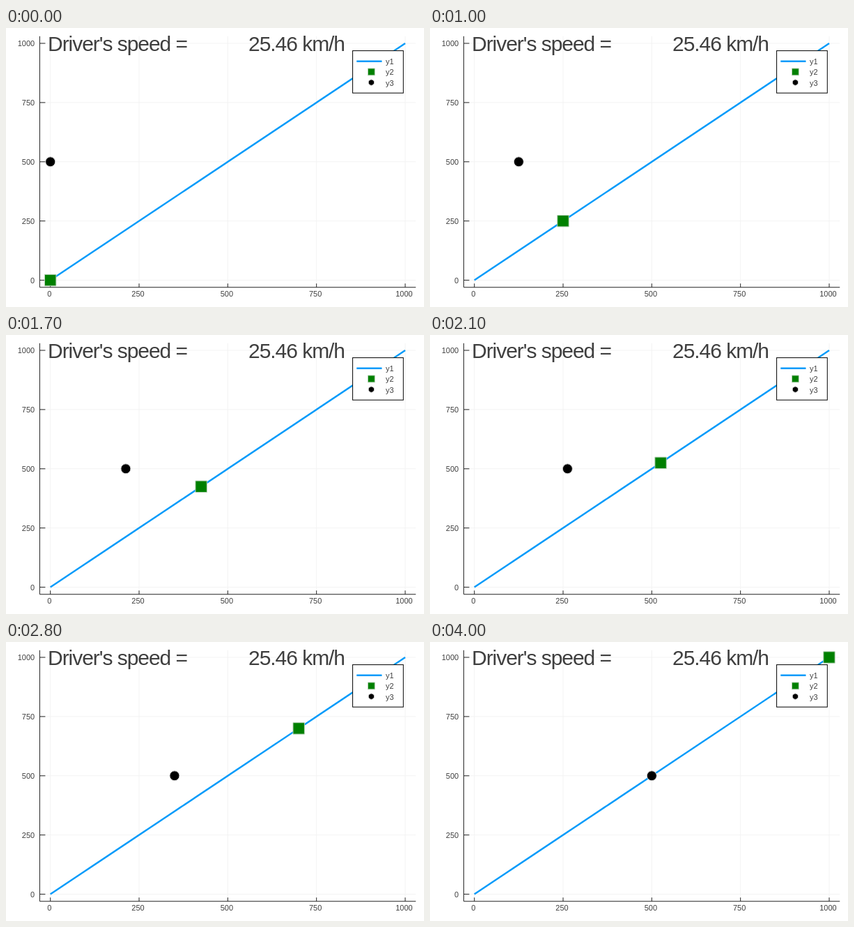
Recreate the animation shown at these times as an HTML page. Size 600x400 px, loop 4100 ms.

```html
<!DOCTYPE html>
<html lang="en">
<head>
<meta charset="utf-8">
<title>Driver's speed</title>
<style>
  html, body { margin: 0; width: 100%; height: 100%; overflow: hidden; background: #fff; }
  svg { display: block; }
  text { font: 11px "Liberation Sans", Arial, sans-serif; fill: #3f3f3f; }
  .title { font-size: 30px; letter-spacing: -1.04px; }
  .grid { stroke: #f3f3f3; }
  .axis { stroke: #222; }
  .curve { stroke: #009afa; stroke-width: 2.4; }
  .mark { stroke-width: 1; vector-effect: non-scaling-stroke; }
</style>
</head>
<body>
<svg width="600" height="400" viewBox="0 0 600 400">
  <defs>
    <rect id="square" class="mark" x="-8.2" y="-8.2" width="16.4" height="16.4" fill="#008000" stroke="#b4d0b4"/>
    <circle id="dot" class="mark" r="7" stroke="#d4d4d4"/>
  </defs>
  <g id="plot"></g>
  <line id="curve" class="curve"/>
  <use id="car" href="#square"/>
  <use id="driver" href="#dot"/>
  <text class="title" x="60" y="33">Driver's speed =</text>
  <text class="title" x="348" y="33">25.46 km/h</text>
  <g>
    <rect x="497.6" y="32.6" width="72.7" height="60.6" fill="#fff" stroke="#000"/>
    <path class="curve" d="M503.3 47.8H539.5"/>
    <use href="#square" transform="translate(524.4 62.9) scale(.6)"/>
    <use href="#dot" transform="translate(524.4 78.1) scale(.6)"/>
    <text x="545" y="52">y1</text>
    <text x="545" y="67">y2</text>
    <text x="545" y="83">y3</text>
  </g>
</svg>
<script>
const STEP = 100, STEPS = 41;
const MIN = -30, MAX = 1030;
const px = v => 63.7 + v * 0.5093;
const py = v => 361.6 - v * 0.3396;
const $ = id => document.getElementById(id);

function add(tag, attrs, text = "") {
  const el = document.createElementNS("http://www.w3.org/2000/svg", tag);
  for (const key in attrs) el.setAttribute(key, attrs[key]);
  el.textContent = text;
  $("plot").append(el);
}

const left = px(MIN), right = px(MAX), top_ = py(MAX), bottom = py(MIN);

for (let v = 0; v <= 1000; v += 250) {
  const x = px(v), y = py(v);
  add("path", { class: "grid", d: `M${x} ${top_}V${bottom}M${left} ${y}H${right}` });
  add("path", { class: "axis", d: `M${x} ${bottom}v-5.4M${left} ${y}h8` });
  add("text", { x: x - 1.5, y: 385, "text-anchor": "middle" }, v);
  add("text", { x: 41.2, y: y + 4, "text-anchor": "end" }, v);
}
add("path", { class: "axis", fill: "none", d: `M${left} ${top_}V${bottom}H${right}` });

const ends = { x1: px(0), y1: py(0), x2: px(1000), y2: py(1000) };
for (const key in ends) $("curve").setAttribute(key, ends[key]);

const place = (id, x, y) => $(id).setAttribute("transform", `translate(${px(x)} ${py(y)})`);

function draw(now) {
  const n = Math.floor(now / STEP) % STEPS;
  place("car", 25 * n, 25 * n);
  place("driver", 12.5 * n, 500);
}

const start = performance.now();
function tick() {
  draw(performance.now() - start);
  requestAnimationFrame(tick);
}
tick();
</script>
</body>
</html>
```
